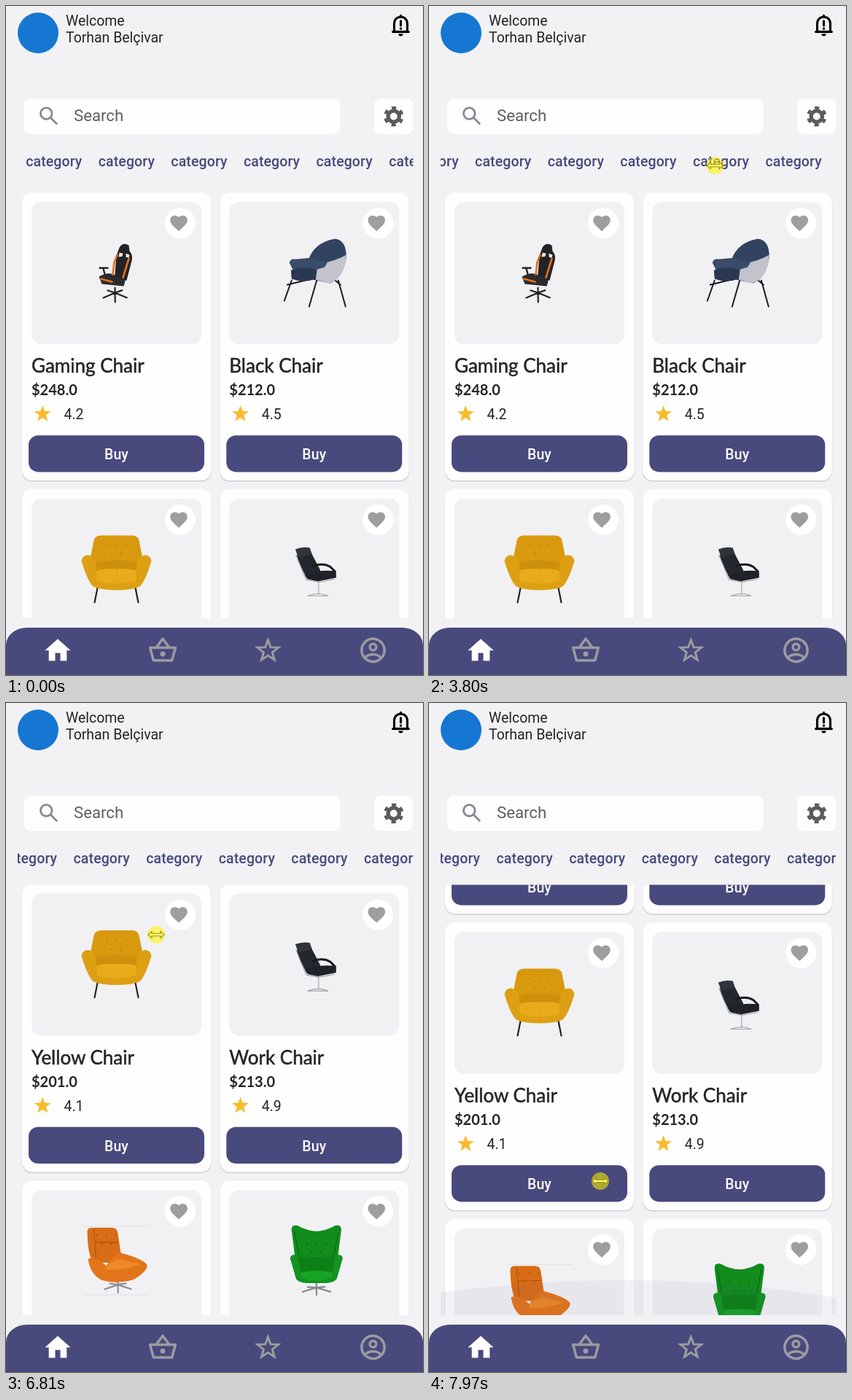
An HTML page for the animation above (8 s loop, 572 by 918 pixels).

```html
<!DOCTYPE html>
<html lang="en">
<head>
<meta charset="utf-8">
<title>Chair shop</title>
<style>
  html, body { margin: 0; width: 100%; height: 100%; overflow: hidden; background: #f2f2f5; }
  svg { display: block; }
  text { font: 19.46px Roboto, sans-serif; fill: #242428; }
  .mid { text-anchor: middle; font-weight: 500; letter-spacing: .14px; }
  .title { font: 26px Lato, sans-serif; stroke: #242428; stroke-width: .5px; }
  .price { font: bold 20px Lato, sans-serif; }
  .cat text { fill: #474a7e; }
  .cat rect { fill: none; }
  .cat.on rect, .buy rect { fill: #484a7d; }
  .cat.on text, .buy text { fill: #fff; }
  .line { fill: none; stroke-linecap: round; stroke-linejoin: round; }
</style>
</head>
<body>
<svg width="572" height="918" viewBox="0 0 572 918">
  <defs>
    <clipPath id="listClip"><path d="M16 249.5H558.5V840H16z"/></clipPath>
    <clipPath id="catClip"><path d="M16 185H558.5V242H16z"/></clipPath>
    <path id="heart" d="M12 21.3l-1.4-1.3C5.4 15.4 2 12.3 2 8.5 2 5.4 4.4 3 7.5 3c1.7 0 3.4.8 4.5 2.1C13.1 3.8 14.8 3 16.5 3 19.6 3 22 5.4 22 8.5c0 3.8-3.4 6.9-8.6 11.5z"/>
    <path id="home" d="M10 20v-6h4v6h5v-8h3L12 3 2 12h3v8z"/>
    <g id="basket" fill="none" stroke="#9c9ba1" stroke-width="2" stroke-linejoin="round">
      <path d="M2 10H22L19.3 20H4.700zM6.800 10 12 2.900 17.200 10"/><circle cx="12" cy="15" r="1"/>
    </g>
    <g id="user" fill="none" stroke="#9c9ba1" stroke-width="2">
      <circle cx="12" cy="12" r="9"/><circle cx="12" cy="9.5" r="2.5"/><path d="M5.8 17.8c2.7-3.3 9.7-3.3 12.4 0"/>
    </g>
    <path id="search" class="line" stroke="#8b8894" stroke-width="2" style="stroke-linecap:butt" d="M14 14 20 20M15 9.500a5.500 5.500 0 10-11 0 5.500 5.500 0 0011 0z"/>
    <g id="gear" fill="none" stroke="#5c5c5e">
      <circle cx="12" cy="12" r="5.4" stroke-width="3.8"/>
      <circle cx="12" cy="12" r="8.2" stroke-width="3" stroke-dasharray="4.2 4.387" stroke-dashoffset="2.1" transform="rotate(30 12 12)"/>
    </g>
    <g id="bell">
      <path class="line" stroke="#000" stroke-width="2" d="M6.2 18v-7c0-3.6 2.4-6 5.8-6s5.8 2.4 5.8 6v7M5 18.2h14M12 3.7v1M12 8.6v4"/>
      <circle cx="12" cy="15.4" r="1.1"/><path d="M10 20h4a2 2 0 01-4 0z"/>
    </g>
  </defs>

  <circle cx="44" cy="37" r="28" fill="#1677d2"/>
  <text x="82" y="27">Welcome</text>
  <text x="82" y="49.5">Torhan Belçivar</text>
  <rect x="25" y="127" width="433.5" height="48.5" rx="9" fill="#fefefe"/>
  <rect x="505" y="127" width="53.5" height="48.5" rx="9" fill="#fefefe"/>
  <text x="93" y="158" style="font-size:22.2px;fill:#5f5d66">Search</text>
  <g id="topIcons"></g>
  <g clip-path="url(#catClip)"><g id="cats"></g></g>
  <g clip-path="url(#listClip)"><g id="list"></g><ellipse id="glow" cx="265" rx="1030" fill="#484a7d"/></g>
  <path d="M0 918V877a29 24 0 0129-24H543a29 24 0 0129 24V918z" fill="#484a7d"/>
  <g id="navIcons"></g>
  <g id="cursor">
    <path d="M-11 0-6-4.6V-1.8H6V-4.6L11 0 6 4.6V1.8H-6V4.6z" fill="#fff" stroke="#111" stroke-width="1.1"/>
    <circle id="halo" r="12"/>
  </g>
</svg>
<script>
const $ = id => document.getElementById(id);
const COL = 271.3, ROW = 407, CAT = 99.6, CAT_END = 453.4;
const repeat = (n, f) => Array.from({ length: n }, (_, i) => f(i)).join('');

const icon = (id, x, y, scale, color) =>
  `<use href="#${id}" fill="${color}" transform="translate(${x} ${y}) scale(${scale}) translate(-12 -12)"/>`;
const fill = (color, d) => `<path fill="${color}" d="${d}"/>`;
const line = (color, width, d) => `<path class="line" stroke="${color}" stroke-width="${width}" d="${d}"/>`;
const both = half => half + `<g transform="scale(-1 1)">${half}</g>`;
const move = (x, y, art) => `<g transform="translate(${x} ${y})">${art}</g>`;

// Five-pointed star on a circle of radius r; every second point is an inner one.
const star = (x, y, r, attrs) => `<polygon ${attrs} points="${repeat(10, i => {
  const a = i * Math.PI / 5, d = i % 2 ? r * .42 : r;
  return `${x + d * Math.sin(a)},${y - d * Math.cos(a)} `;
})}"/>`;

// Swivel foot: a post and five legs spread over a flat ellipse.
const foot = (color, y, rx, ry) => line(color, 2.2, `M0 ${y - 7}V${y}` + repeat(5, i => {
  const a = i * Math.PI * .4 + .3;
  return `M0 ${y}L${rx * Math.cos(a)} ${y + 4 + ry * Math.sin(a)}`;
}));

const tufts = (color, x, y) => repeat(5, i =>
  `<circle cx="${x + (i - 2) * 6.5}" cy="${y + i % 2 * 12}" r="1.1" fill="${color}"/>`);

// Chairs are drawn around the middle of their picture box.
const chairs = [
  ['Gaming Chair', 248, 4.2,
    line('#222326', 2.4, 'M-23-7h11M-18-6l3 11') + move(-2, 0, foot('#222326', 27, 17, 9)) +
    fill('#222326', 'M4-35Q9-43 17-38L18-30Q23-25 21-17L14 10-3 12 0-24z') +
    fill('#2b2b2e', 'M-24 5Q-11-3-1 3L12 11 10 18-20 15z') +
    line('#e2721c', 2.6, 'M1-25-3-15-5 2M17-20 9 6M-21 8-6 12') +
    fill('#f0e8e2', 'M4-28l5 1-1 4-5 1zM13-27l5 2-1 4-4-1z')],
  ['Black Chair', 212, 4.5,
    line('#1b1c20', 2, 'M-31 10-41 38M4 8-7 46M33 10 43 46M-37 16 0 7H25L36 16') +
    fill('#32435f', 'M-8-18Q0-42 28-47 44-46 44-22 40 6 22 14L-2 9z') +
    fill('#c2c3cb', 'M44-25Q42 8 20 14L2 9 5-12Q28-16 44-25z') +
    fill('#3a4c69', 'M-34-14Q-33-20-26-19L-4-21 18-14 14-8 0-4-28-2z') +
    fill('#293750', 'M-32-4Q-16-10 2-5V8Q-14 14-31 8z')],
  ['Yellow Chair', 201, 4.1,
    both(line('#242220', 2.2, 'M26 25 30 45') +
      fill('#d9990f', 'M-1-47H22Q30-46 31-40L36-15V15H-1z') +
      fill('#cc900c', 'M-1-13Q18-13 28-9V12H-1z') +
      fill('#dda013', 'M48-12Q46-21 38-20 29-17 28-5L26 12Q14 15-1 15V28Q22 28 32 23 40 15 48-12z') +
      fill('#e8ab1a', 'M-1-1Q16-2 27 1V15Q14 19-1 19z')) +
    tufts('#b47b08', 0, -33)],
  ['Work Chair', 213, 4.9,
    line('#a0a2a8', 1.1, 'M-25-20-11 14 7 17 28 13M6 16V34M-9 36Q6 30 19 36z') +
    fill('#24282e', 'M-24-20-4-23 8 0 11 13-10 12Q-19-4-24-20z') +
    fill('#30353c', 'M-26-28Q-16-32-6-30L-3-21-22-17z') +
    fill('#1f2329', 'M-13 7Q8-1 30 2V11L5 16-9 13z') +
    line('#181b20', 3, 'M-2-5Q12-10 22-4L28 2')],
  ['Lounge Chair', 217, 4.5,
    line('#e1e1e4', 1, 'M-43-48H44M-43 46H44') + move(2, 0, foot('#8d8f94', 32, 19, 7)) +
    fill('#d96c16', 'M-40-41Q-40-46-33-46H-6Q1-46 2-38L6-11 0 2H-33Q-40-15-40-41z') +
    fill('#e2751a', 'M-39-3Q-30-8-14 6-4-8 4-12 38-3 42 5 44 12 24 25 0 32-20 26-36 18-39-3z') +
    fill('#ee8828', 'M-14 6Q0-4 8-2L33 4Q14 12-14 12z') +
    line('#b0530d', 1.1, 'M-31-44-28-4M-29-26H2') + tufts('#a94f0c', -14, -36)],
  ['Green Chair', 248, 4.8,
    move(3, 0, foot('#85888c', 36, 20, 6) + both(
      fill('#118c1d', 'M-1-41Q14-42 26-49 35-51 34-42L29-3 25 16H-1z') +
      fill('#0c8017', 'M-1-6H25L22 16H-1z') +
      fill('#139320', 'M36-4Q36-10 26-9L22 14H-1V30H14Q25 29 28 24z') +
      fill('#18a327', 'M-1 13Q14 13 22 16L21 23Q10 26-1 27z') +
      line('#08620f', 1, 'M30-40 24-9')) + tufts('#08620f', 0, -24))]
];

const card = ([name, price, rating, art], i) => move(i % 2 * COL, (i >> 1) * ROW, `
  <rect x="21.500" y="257" width="260.500" height="396" rx="14" fill="#d8d8dd"/>
  <rect x="22" y="256" width="259.500" height="395" rx="14" fill="#fefefe"/>
  <rect x="35" y="269" width="233" height="195" rx="13" fill="#f1f1f4"/>
  ${move(151.5, 366.5, art)}
  <circle cx="239" cy="298" r="21" fill="#fff"/>
  ${icon('heart', 237, 298, 1.18, '#9e9e9e')}
  <text class="title" x="35" y="503">${name}</text>
  <text class="price" x="35" y="534">$${price}.0</text>
  ${star(50.2, 560, 12, 'fill="#f8bb2d"')}
  <text x="79.500" y="567">${rating}</text>
  <g class="buy"><rect x="31" y="589.200" width="241" height="50.200" rx="13"/>
  <text class="mid" x="151.500" y="622">Buy</text></g>`);

const category = i => `<g class="cat" transform="translate(${16 + i * CAT} 0)">
  <rect y="189" width="99.300" height="47.500" rx="23.700"/>
  <text class="mid" x="49.800" y="219.600">category</text></g>`;

$('topIcons').innerHTML = icon('search', 58.8, 151, 1.42, 'none') +
  icon('gear', 531.8, 151.5, 1.42, 'none') + icon('bell', 541.5, 25.8, 1.55, '#000');
$('navIcons').innerHTML = icon('home', 71, 884.3, 1.76, '#fff') + icon('basket', 215, 884, 1.74, 'none') +
  star(359.3, 885, 15, 'fill="none" stroke="#9c9ba1" stroke-width="3"') + icon('user', 503.5, 884, 1.74, 'none');
$('list').innerHTML = chairs.map(card).join('');
$('cats').innerHTML = repeat(10, category);
const picked = $('cats').children[3];

// Progress from time a to b, clamped to 0..1, and its eased form.
const part = (t, a, b) => Math.min(1, Math.max(0, (t - a) / (b - a)));
const ease = k => k * k * (3 - 2 * k);

// Walks through points [time, value, ...].
function along(points, t, curve = k => k) {
  const next = points.findIndex(p => p[0] > t);
  if (next < 0) return points.at(-1).slice(1);
  const a = points[Math.max(0, next - 1)], b = points[next];
  const k = curve(part(t, a[0], b[0]));
  return a.slice(1).map((v, j) => v + (b[j + 1] - v) * k);
}

const approach = [[200, 160, 564], [860, 427, 808], [1400, 308, 480], [1880, 363, 215], [2400, 363, 215],
  [2638, 358, 215], [2800, 428, 217]];
const drags = [[5077, 401, 219], [5850, 168, 412], [6144, 174, 253], [6600, 200, 420], [6829, 206, 318],
  [7480, 240, 545], [7744, 241, 346], [7972, 235, 656]];
const listStops = [[5880, 0], [6144, 159], [6500, 318], [6829, 414.3], [7480, 550], [7744, 631], [7972, 362]];

function pointer(t) {
  if (t < 2950) return along(approach, t);
  if (t > 5077) return along(drags, t, ease);
  // Swiping back and forth over the categories
  return [314 + 114 * Math.cos((t - 2950) / 736 * 2 * Math.PI), 219];
}

function draw(time) {
  const t = 200 + Math.floor((time - 200) / 76.2 + .25) * 76.2;
  $('cursor').setAttribute('transform', `translate(${pointer(t)})`);
  $('cursor').setAttribute('visibility', time < 200 ? 'hidden' : 'visible');
  $('halo').setAttribute('fill', t < 2900 ? 'none'
    : t > 6100 && t < 6200 ? 'rgba(255,190,40,.55)' : 'rgba(255,242,0,.57)');
  picked.classList.toggle('on', t > 2330 && t < 3100);

  const swipe = CAT_END * ease(part(t, 2950, 5000)) - 20.8 * part(t, 5077, 5240);
  $('cats').setAttribute('transform', `translate(${-swipe} 0)`);
  $('list').setAttribute('transform', `translate(0 ${-along(listStops, t)[0]})`);

  // Overscroll glow flattens while it fades.
  const fade = part(t, 7744, 7972), ry = 1030 - 446 * fade;
  $('glow').setAttribute('cy', 755 + 37 * fade + ry);
  $('glow').setAttribute('ry', ry);
  $('glow').setAttribute('opacity', t < 7740 ? 0 : .11 - .045 * fade);
}

function tick() {
  draw(performance.now() % 8000);
  requestAnimationFrame(tick);
}
tick();
</script>
</body>
</html>
```
